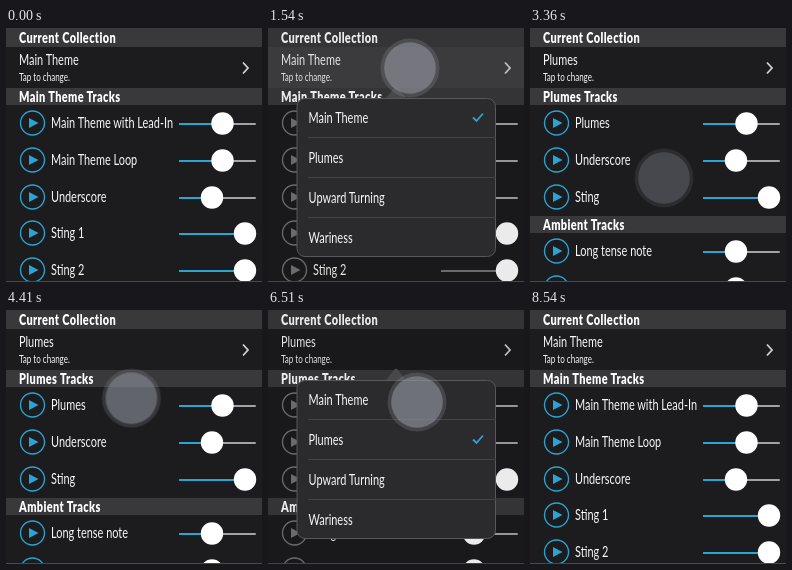
These frames come from a looping animation (256x254 px, 8610 ms). An HTML page:

```html
<!DOCTYPE html>
<html lang="en">
<head>
<meta charset="utf-8">
<title>Track picker</title>
<style>
  html, body { margin: 0; width: 100%; height: 100%; overflow: hidden; background: #1c1b1d; }
  svg { display: block; width: 100%; height: 100%; }
  text { font: 15px Lato, "Open Sans", sans-serif; fill: #f8f8f8; }
  .head { font-weight: 900; letter-spacing: .5px; fill: #fff; }
  .small { font-size: 11px; }
  .band { fill: #39383a; }
  .line { fill: none; stroke-width: 1.3; }
  .bold { stroke-width: 1.8; }

  .tint, .first, .second, .lit, .pop, .dim, .finger, .fade, .ring, .core {
    animation: 8610ms linear infinite;
  }
  .tint { animation-name: tint; }
  .first { animation-name: first; animation-timing-function: step-end; }
  .second { animation-name: second; animation-timing-function: step-end; }
  .lit { animation-name: lit; }
  .pop, .dim { animation-name: pop; }
  .finger { animation-name: move; }
  .fade { animation-name: fade; }
  .ring { animation-name: ring; }
  .core { animation-name: core; }

  /* the two collections swap hard */
  @keyframes first { 0%, 78.86% { opacity: 1 } 35.77% { opacity: 0 } 100% { opacity: 1 } }
  @keyframes second { 0%, 78.86% { opacity: 0 } 35.77% { opacity: 1 } 100% { opacity: 0 } }

  @keyframes lit {
    0%, 14.62% { opacity: 0 }
    14.63%, 16.3% { opacity: 1 }
    17.89% { opacity: .8 }
    19.51%, 59.34% { opacity: 0 }
    59.35%, 62.6% { opacity: 1 }
    64.23% { opacity: .8 }
    65.85%, 100% { opacity: 0 }
  }
  @keyframes pop {
    0%, 15.45% { opacity: 0 }
    17.8%, 34.2% { opacity: 1 }
    37.4%, 61.8% { opacity: 0 }
    64.23%, 77.24% { opacity: 1 }
    80.49%, 100% { opacity: 0 }
  }
  @keyframes tint {
    0%, 15.45% { color: #29a5d3 }
    17.8%, 34.2% { color: #747377 }
    37.4%, 61.8% { color: #29a5d3 }
    64.23%, 77.24% { color: #747377 }
    80.49%, 100% { color: #29a5d3 }
  }
  @keyframes move {
    0%, .4% { transform: translate(150px, 189px); animation-timing-function: cubic-bezier(.12, .2, .5, 1) }
    13% { transform: translate(142px, 40px) }
    20.4% { transform: translate(142px, 40px); animation-timing-function: ease-in-out }
    30.08% { transform: translate(134px, 128px) }
    35.77% { transform: translate(134px, 128px); animation-timing-function: ease-in }
    42.28% { transform: translate(134px, 197px) }
    45.53% { transform: translate(136px, 197px); animation-timing-function: cubic-bezier(.12, .2, .5, 1) }
    57.72% { transform: translate(121px, 43px) }
    65.04% { transform: translate(121px, 43px); animation-timing-function: ease-in-out }
    74% { transform: translate(149px, 92px) }
    78.86% { transform: translate(149px, 92px); animation-timing-function: ease-in }
    86.99%, 100% { transform: translate(150px, 189px) }
  }
  @keyframes fade {
    0%, .4% { opacity: 0 }
    6.5%, 36.6% { opacity: 1 }
    42.28%, 45.2% { opacity: 0 }
    51.8%, 79.7% { opacity: 1 }
    86.99%, 100% { opacity: 0 }
  }
  @keyframes ring {
    0%, 11.38% { transform: scale(1) }
    13%, 15.5% { transform: scale(.92) }
    17.5%, 29.3% { transform: scale(1) }
    30.9%, 35% { transform: scale(.92) }
    37.4%, 56.1% { transform: scale(1) }
    57.72%, 62.6% { transform: scale(.92) }
    64.23%, 76.4% { transform: scale(1) }
    77.6%, 78.4% { transform: scale(.92) }
    80.5%, 100% { transform: scale(1) }
  }
  @keyframes core {
    0%, 11.38% { opacity: .55 }
    13%, 15.5% { opacity: .84 }
    17.5%, 29.3% { opacity: .55 }
    30.9%, 35% { opacity: .88 }
    37.4%, 56.1% { opacity: .55 }
    57.72%, 62.6% { opacity: .78 }
    64.23%, 76.4% { opacity: .55 }
    77.6%, 78.4% { opacity: .84 }
    80.5%, 100% { opacity: .55 }
  }
</style>
</head>
<body>
<svg id="stage" viewBox="0 0 256 254" preserveAspectRatio="none"></svg>
<script>
  // one condensed setting for all type
  const label = (x, y, str, cls = '') =>
    `<text class="${cls}" transform="translate(${x} ${y}) scale(.73 1)">${str}</text>`;

  const band = (y, h, str) =>
    `<rect class="band" y="${y}" width="256" height="${h}"/>` + label(13, y + h / 2 + 5.3, str, 'head');

  const track = (y, name, knob) => `
    <g class="tint">
      <circle class="line" cx="26.5" cy="${y}" r="12" stroke="currentColor"/>
      <path d="M23 ${y - 5}v10l9.5-5z" fill="currentColor"/>
      <rect x="173" y="${y}" width="77" height="2" rx="1" fill="#a3a2a5"/>
      <rect x="173" y="${y}" width="${knob - 173}" height="2" rx="1" fill="currentColor"/>
    </g>
    <circle cx="${knob}" cy="${y + .5}" r="11.2" fill="#fff"/>` + label(45, y + 5, name);

  const title = name => label(13, 37, name);

  const first = title('Main Theme') + band(60, 17, 'Main Theme Tracks') +
    track(95, 'Main Theme with Lead-In', 216.5) +
    track(132, 'Main Theme Loop', 216.5) +
    track(169, 'Underscore', 206) +
    track(205, 'Sting 1', 239) +
    track(242, 'Sting 2', 239);

  const second = title('Plumes') + band(60, 17, 'Plumes Tracks') +
    track(95, 'Plumes', 216.5) +
    track(132, 'Underscore', 206) +
    track(169, 'Sting', 239) +
    band(188, 17, 'Ambient Tracks') +
    track(223, 'Long tense note', 206) +
    track(260, '', 206);

  const check = (y, cls) =>
    `<path class="${cls} line bold" d="M205 ${y}l3.5 3.5 6.5-7.5" stroke="#29a5d3"/>`;

  const items = ['Main Theme', 'Plumes', 'Upward Turning', 'Wariness']
    .map((name, i) => label(40.5, 94.7 + 40 * i, name) +
      (i ? `<path d="M40 ${69.5 + 40 * i}H228" stroke="#434246"/>` : ''))
    .join('');

  document.getElementById('stage').innerHTML = `
    <rect width="256" height="254" fill="#1c1b1d"/>
    <rect class="lit" y="19" width="256" height="41" fill="#4b4a4c"/>
    ${band(0, 19, 'Current Collection')}
    ${label(13, 53, 'Tap to change.', 'small')}
    <path class="line bold" d="M237 34.5l5 5.5-5 5.5" stroke="#d0d0d2"/>
    <g class="first">${first}</g>
    <g class="second">${second}</g>
    <rect y="253" width="256" height="1" fill="#4a494c"/>
    <g class="dim"><rect width="256" height="254" opacity=".08"/></g>
    <g class="pop">
      <path d="M117 71.5L126 60q2-2.500 4 0l9 11.500z" fill="#48474a"/>
      <rect x="29" y="70.5" width="198.500" height="158" rx="8" fill="#2b2a2d" stroke="#58575b"/>
      ${items}
      ${check(89.5, 'first')}
      ${check(129.5, 'second')}
    </g>
    <g class="fade"><g class="finger"><g class="ring">
      <circle r="29.5" fill="#9296a0" opacity=".25"/>
      <circle class="core" r="25.8" fill="#9296a0"/>
    </g></g></g>`;
</script>
</body>
</html>
```
